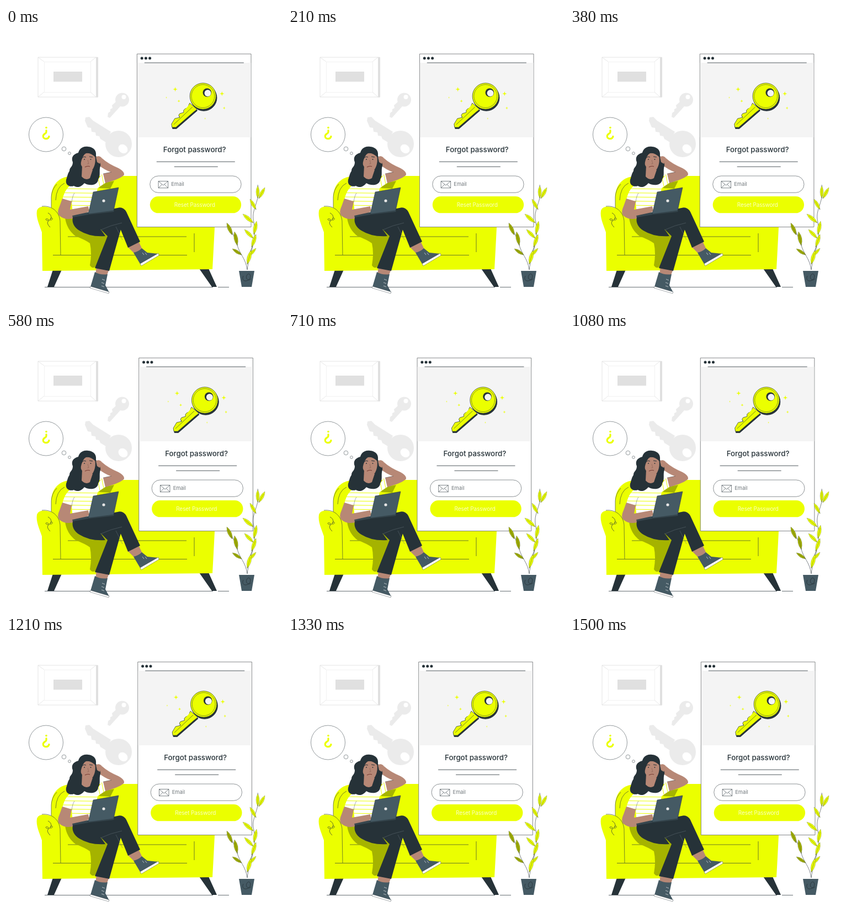
These frames come from a looping animation (500 by 500 pixels, 1540 ms). An HTML page with a canvas:

```html
<!DOCTYPE html>
<html lang="en">
<head>
<meta charset="utf-8">
<title>Forgot password</title>
<style>
html, body { margin: 0; width: 100%; height: 100%; overflow: hidden; background: #fff; }
canvas { display: block; width: 500px; height: 500px; }
</style>
</head>
<body>
<canvas id="stage" width="500" height="500"></canvas>
<script>
const ctx = document.getElementById('stage').getContext('2d');
const YELLOW = '#ebff00', OLIVE = '#a5b300', INK = '#263238', SLATE = '#455a64';
const SKIN = '#b78876', GREY = '#ebebeb', WHITE = '#fff';
const LOOP = 1540, CYCLE = 1500, STEP = 1000 / 24, LEAD = 33;

function paint(path, fill, stroke, width = 0.7) {
  if (fill) { ctx.fillStyle = fill; ctx.fill(path); }
  if (stroke) { ctx.strokeStyle = stroke; ctx.lineWidth = width; ctx.stroke(path); }
}
const shape = (d, fill, stroke, width) => paint(new Path2D(d), fill, stroke, width);
const line = (d, color = INK, width = 0.7) => shape(d, null, color, width);

function disc(x, y, r, fill, stroke, width, ry = r, angle = 0) {
  const p = new Path2D();
  p.ellipse(x, y, r, ry, angle, 0, Math.PI * 2);
  paint(p, fill, stroke, width);
}

function box(x, y, w, h, fill, stroke, radius = 0, width) {
  const p = new Path2D();
  p.roundRect(x, y, w, h, radius);
  paint(p, fill, stroke, width);
}

function label(text, x, y, font, color) {
  ctx.font = font + ' Inter, sans-serif';
  ctx.fillStyle = color;
  ctx.fillText(text, x, y);
}

function sparkle(x, y, r) {
  const k = r * 0.22;
  shape(`M${x} ${y - r}L${x + k} ${y - k}L${x + r} ${y}L${x + k} ${y + k}L${x} ${y + r}` +
    `L${x - k} ${y + k}L${x - r} ${y}L${x - k} ${y - k}Z`, YELLOW);
}

function leaf(x, y, tipX, tipY, fill = YELLOW) {
  const dx = tipX - x, dy = tipY - y, k = 0.27;
  const mx = (x + tipX) / 2, my = (y + tipY) / 2;
  shape(`M${x} ${y}Q${mx - dy * k} ${my + dx * k} ${tipX} ${tipY}` +
    `Q${mx + dy * k} ${my - dx * k} ${x} ${y}Z`, fill, INK, 0.25);
  line(`M${x} ${y}L${x + dx * 0.8} ${y + dy * 0.8}`, INK, 0.4);
}

function drawWall() {
  box(58, 53, 108, 72, WHITE, '#dedede', 0, 0.8);
  box(163, 53, 4, 72.5, '#e0e0e0');
  box(69.5, 61.5, 84, 55, null, '#ededed', 0, 0.7);
  line('M58 53L69 61M163 53L153 61M58 125L69 116M163 125L153 116', '#dedede');
  box(86, 79, 52, 18.3, '#e0e0e0');

  shape('M201 132L192 140L193 145L189 147L189 151L185 154L184 161L188 163L207 142Z', GREY);
  disc(210.5, 130, 12.5, GREY);
  disc(213.5, 125, 4, WHITE);
  shape('M181 207L171 201L169 196L163 195L162 189L155 188L154 181L148 180L143 168' +
    'L144 162L151 161L158 168L190 188Z', GREY);
  disc(204, 210, 24, GREY);
  disc(212, 219, 9, WHITE, null, 0, 7.5, 0.7);
}

function drawThought() {
  disc(72.5, 193, 31, WHITE, INK, 0.5);
  disc(105, 219, 3.8, WHITE, INK, 0.5);
  disc(115, 227, 2.4, WHITE, INK, 0.5);
  disc(73, 180.5, 1.8, YELLOW);
  ctx.lineCap = 'round';
  line('M73 185.5V188.5C73 191.5 67.3 191.5 67.3 196C67.3 202 76.5 202 78 196.5', YELLOW, 3.2);
  ctx.lineCap = 'butt';
}

function drawSofa() {
  shape('M85 438H101L87 469H75ZM350 436H367L382 469H373Z', INK);
  line('M70 469.5H375M384 469.5H404');
  shape('M82 326V303Q84 282 100 273Q110 268 125 268H340Q372 270 378 330V361' +
    'Q376 402 374 437L66 440L65 370C60 355 54 343 56 331C59 322 70 322 82 326Z', YELLOW);
  line('M90 312Q91 288 106 281M82 325V306Q83 292 92 283', INK, 0.6);
  line('M65 323C84 321 97 334 98 350L99 411', INK, 0.6);
  line('M85 411.5H328M112 378H327M341 372V406', INK, 0.65);
  line('M76 335C82 338 84 344 79 348C74 351 74 355 80 361M80 346C84 341 87 348 80 348' +
    'M78 348C72 342 69 349 77 349', INK, 0.7);
  // Shadows cast on the upholstery.
  shape('M107 344Q110 365 126 377Q144 384 152 390Q156 408 152 430Q157 438 165 431' +
    'L186 376L160 350Z', OLIVE);
  shape('M168 290L176 281L196 277L189 291Z', OLIVE);
}

function drawShoes() {
  shape('M164 432L187 437L182 450L162 447Z', SKIN);
  shape('M220 396L240 386L247 401L233 409Z', SKIN);
  shape('M161 442Q171 448 184 446L180 466L187 479L184 480L153 469Z', SLATE);
  shape('M153 468L187 478L186 481L152 471Z', WHITE, INK, 0.4);
  line('M174 455L179 457M173 461L178 463M173 467L178 469', WHITE, 0.6);
  shape('M231 407Q240 405 246 399L256 407L276 409L244 429Z', SLATE);
  shape('M243 427L276 408L277 412L245 431Z', WHITE, INK, 0.4);
  line('M247 407L250 411M252 407L255 411', WHITE, 0.6);
}

function drawTorso() {
  const shirt = new Path2D('M120 283Q140 275 163 280L176 262L181 280L166 290L163 306L151 334' +
    'L121 338L119 315L102 311Q107 290 120 283Z');
  paint(shirt, WHITE);
  ctx.save();
  ctx.clip(shirt);
  for (let y = 291; y < 336; y += 7.5) line(`M100 ${y}L182 ${y + 1}`, YELLOW, 1);
  line('M165 263L171 291M172 258L178 288', YELLOW, 1);
  ctx.restore();
  line('M119 316Q120 305 124 299', INK, 0.4);
}

function drawHead() {
  shape('M163 233Q169 231 174 236Q185 246 204 254Q215 260 214 266Q208 273 180 281' +
    'L176 264L190 261Q178 257 166 247Z', SKIN);
  line('M176 264L191 261', INK, 0.4);
  shape('M149 215C137 213 132 221 131 226C120 229 118 236 121 243C121 252 115 252 115 259' +
    'C111 265 111 270 109 275C107 284 115 289 123 286C131 291 138 286 142 281' +
    'C151 287 167 285 167 274C172 267 168 258 171 250C173 242 164 239 163 231' +
    'C164 222 159 216 149 215Z', INK);
  shape('M138 249L157 257L152 272Q144 277 137 269Z', SKIN);
  shape('M134 236C137 226 150 223 161 232C163 240 161 250 157 256C150 262 140 257 136 248Z', SKIN);
  shape('M131 240Q134 222 156 220L163 229L163 235Q154 226 146 226Q138 230 135 247Z', INK);
  shape('M163 234Q169 230 173 235L170 246L165 243Z', SKIN);
  line('M138 235Q141 232 145 234M151 233L157 234', INK, 1);
  disc(142, 238, 0.9, INK);
  disc(153.5, 238, 0.9, INK);
  line('M148 239L150 246L147 246', '#7d554a', 0.5);
  line('M143 252Q148 249 152 251', '#7a3f36', 1.1);
}

function drawWoman() {
  drawShoes();
  drawTorso();
  drawHead();
  shape('M102 309L119 314L116 329L149 323L151 332L128 343Q109 350 98 341' +
    'Q91 336 97 323Z', SKIN);
  shape('M121 342L202 326Q212 323 218 333L243 387L221 398L206 361L211 354' +
    'L187 440L161 435L184 377L171 364L180 377' +
    'Q152 379 133 367Q118 358 121 342Z', INK);
  line('M171 366Q190 357 210 353M199 360L211 384', '#647178', 0.5);
  shape('M120 340L152 333L196 331L195 333L150 338L121 343Z', '#37474f');
  shape('M158 297L204 289L195 331L149 337Z', SLATE, INK, 0.5);
  disc(177, 313, 2.6, '#e6e6e6');
}

function drawPlant() {
  line('M437 438C440 410 455 387 449 352C444 332 455 322 458 296L456 284', INK, 0.6);
  line('M437 438C434 416 423 411 418 390Q411 370 406 365M441 408Q450 389 452 375', INK, 0.6);
  leaf(456, 308, 456, 286);
  leaf(458, 309, 469, 289);
  leaf(453, 329, 442, 310);
  leaf(448, 353, 429, 337);
  leaf(449, 374, 454, 350);
  leaf(448, 381, 432, 365);
  leaf(445, 397, 453, 374);
  leaf(410, 375, 400, 353, OLIVE);
  leaf(419, 394, 414, 369, OLIVE);
  leaf(427, 411, 410, 400, OLIVE);
  leaf(440, 413, 453, 399);
  leaf(437, 428, 444, 403);
  shape('M422 440H450L445 469H427Z', SLATE);
  line('M430 449C426 457 433 461 440 456C446 450 441 442 437 447C432 454 440 460 444 454', INK, 0.8);
}

function drawKey() {
  const shaft = 'M333 136L331 140L333 145L325 146L322 149L322 153L315 155L313 158L315 162' +
    'L306 164L300 174L301 180L308 180L346 147Z';
  ctx.save();
  ctx.translate(1, 2.5);
  shape(shaft, INK, INK, 0.8);
  disc(357.5, 124, 23.7, INK, INK, 0.8);
  ctx.restore();
  shape(shaft, YELLOW, INK, 0.7);
  disc(357, 123.5, 23.7, YELLOW, INK, 0.7);
  shape('M333 138L345 148L335 155L325 147Z', YELLOW);
  disc(357, 123.5, 21, null, INK, 0.5);
  line('M304 175L338 143', INK, 0.6);
  disc(364.5, 117, 7.8, INK);
  disc(365.7, 118, 6, '#f5f5f5');
}

function drawPanel(shift) {
  ctx.save();
  ctx.translate(shift, 0);
  box(237.6, 47, 206.6, 313.5, WHITE, '#65696b', 0, 0.8);
  box(238.1, 63, 205.6, 135, '#f4f4f4');
  for (const x of [246.4, 253.6, 260.8]) disc(x, 54.8, 2.5, INK);
  line('M251 63H431M273 242.3H415M305 251.3H384', INK, 0.8);
  sparkle(306.8, 111, 4.3);
  sparkle(391.5, 119, 4.3);
  sparkle(313.3, 132.3, 2.7);
  sparkle(395.5, 145, 2.7);
  sparkle(290.8, 126, 1.7);
  sparkle(361, 164, 1.7);
  drawKey();
  label('Forgot password?', 285, 224.8, '500 13.3px', INK);
  box(261, 268, 165.3, 30.3, WHITE, '#5b6266', 15.1, 0.7);
  box(276.3, 277.5, 17.5, 12.3, null, INK, 0, 0.6);
  line('M276.3 277.5L285 285L293.8 277.5M276.3 289.8L283 283.3M293.8 289.8L287 283.3', INK, 0.6);
  label('Email', 299.5, 286.3, '400 9.3px', '#72797d');
  box(261, 305, 165.3, 30.3, YELLOW, null, 15.1);
  label('Reset Password', 305, 324, '300 10px', WHITE);
  ctx.restore();
}

// Horizontal shake: offsets at every tenth of the cycle.
const SHAKE = [0, -1, 2, -4, 4, -4, 4, -4, 2, -1, 0];

function shakeAt(time) {
  const tick = Math.floor((Math.floor(time / 10) * 10 + 4.9) / STEP);
  const pos = ((tick * STEP + LEAD) % CYCLE) / CYCLE * 10;
  const i = Math.floor(pos);
  return SHAKE[i] + (SHAKE[i + 1] - SHAKE[i]) * (pos - i);
}

function render(time) {
  ctx.fillStyle = WHITE;
  ctx.fillRect(0, 0, 500, 500);
  drawWall();
  drawThought();
  drawSofa();
  drawWoman();
  drawPanel(shakeAt(time));
  drawPlant();
}

const start = performance.now();
function loop() {
  render((performance.now() - start) % LOOP);
  requestAnimationFrame(loop);
}
loop();
</script>
</body>
</html>
```
